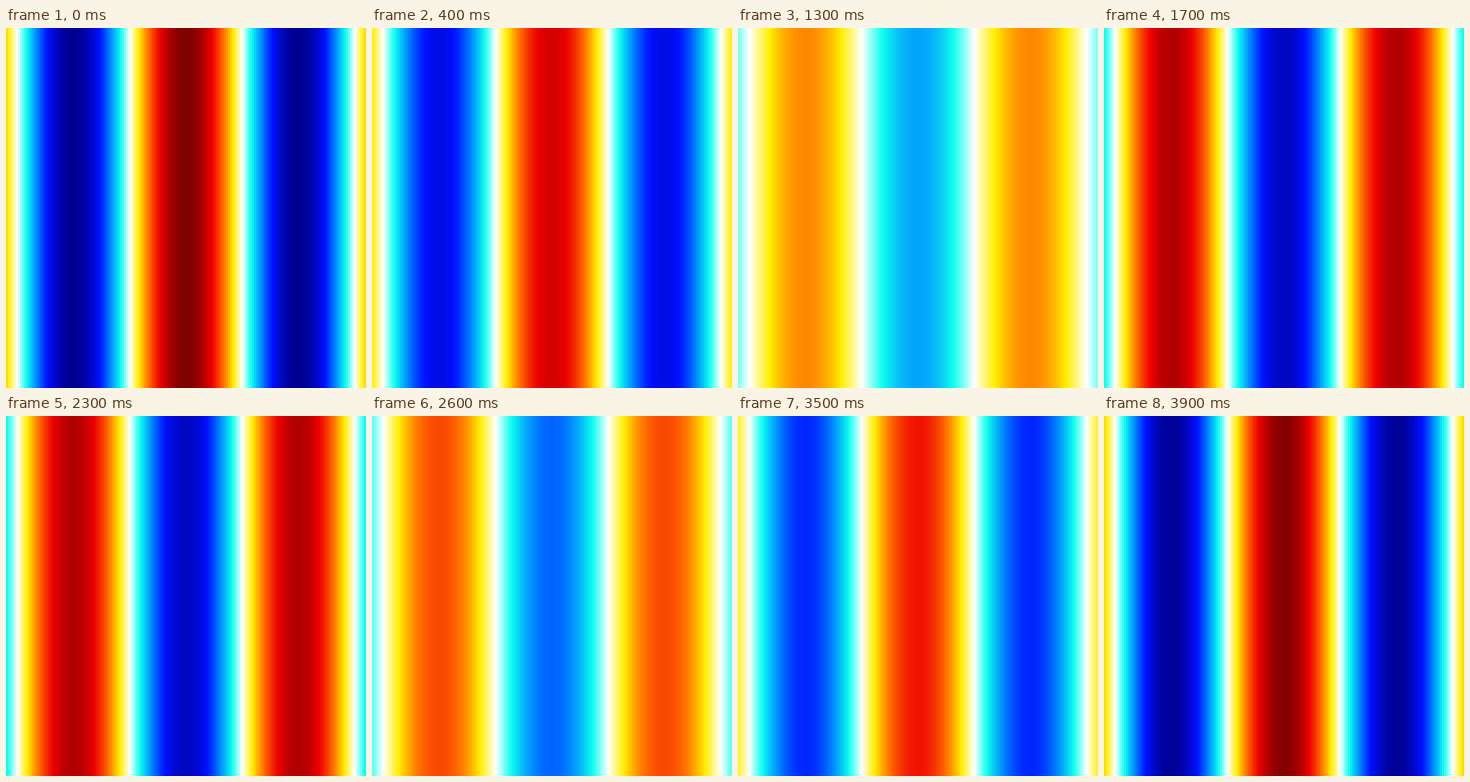
An HTML page with a canvas that plays this animation: 360x360 px, repeating every 4000 ms.

```html
<!DOCTYPE html>
<html>
<head>
<meta charset="utf-8">
<title>Standing wave</title>
<style>
  html, body { margin: 0; width: 100%; height: 100%; overflow: hidden; }
  canvas { display: block; width: 360px; height: 360px; }
</style>
</head>
<body>
<canvas id="stage" width="360" height="360"></canvas>
<script>
const SIZE = 360, CELL = 2, CELLS = SIZE / CELL;
const STEP = 100, STEPS = 40;
const ctx = document.getElementById('stage').getContext('2d');

// Key colours, evenly spaced from trough through rest to crest
const keys = '#000090 #000fff #0090ff #0fffee #ffffff #ffee00 #ff7000 #ee0000 #7f0000'
  .split(' ')
  .map(hex => hex.match(/\w\w/g).map(pair => parseInt(pair, 16)));

function colorOf(value) {
  const pos = (value + 1) / 2 * (keys.length - 1);
  const i = Math.min(Math.floor(pos), keys.length - 2);
  const rgb = keys[i].map((c, k) => Math.round(c + (keys[i + 1][k] - c) * (pos - i)));
  return `rgb(${rgb})`;
}

function draw() {
  const step = Math.floor(performance.now() / STEP) % STEPS;
  const amplitude = Math.cos(2 * Math.PI * step / STEPS);
  for (let i = 0; i < CELLS; i++) {
    const x = -5 + 10 * i / (CELLS - 1);
    ctx.fillStyle = colorOf(amplitude * Math.cos(x));
    ctx.fillRect(i * CELL, 0, CELL, SIZE);
  }
  requestAnimationFrame(draw);
}
draw();
</script>
</body>
</html>
```
